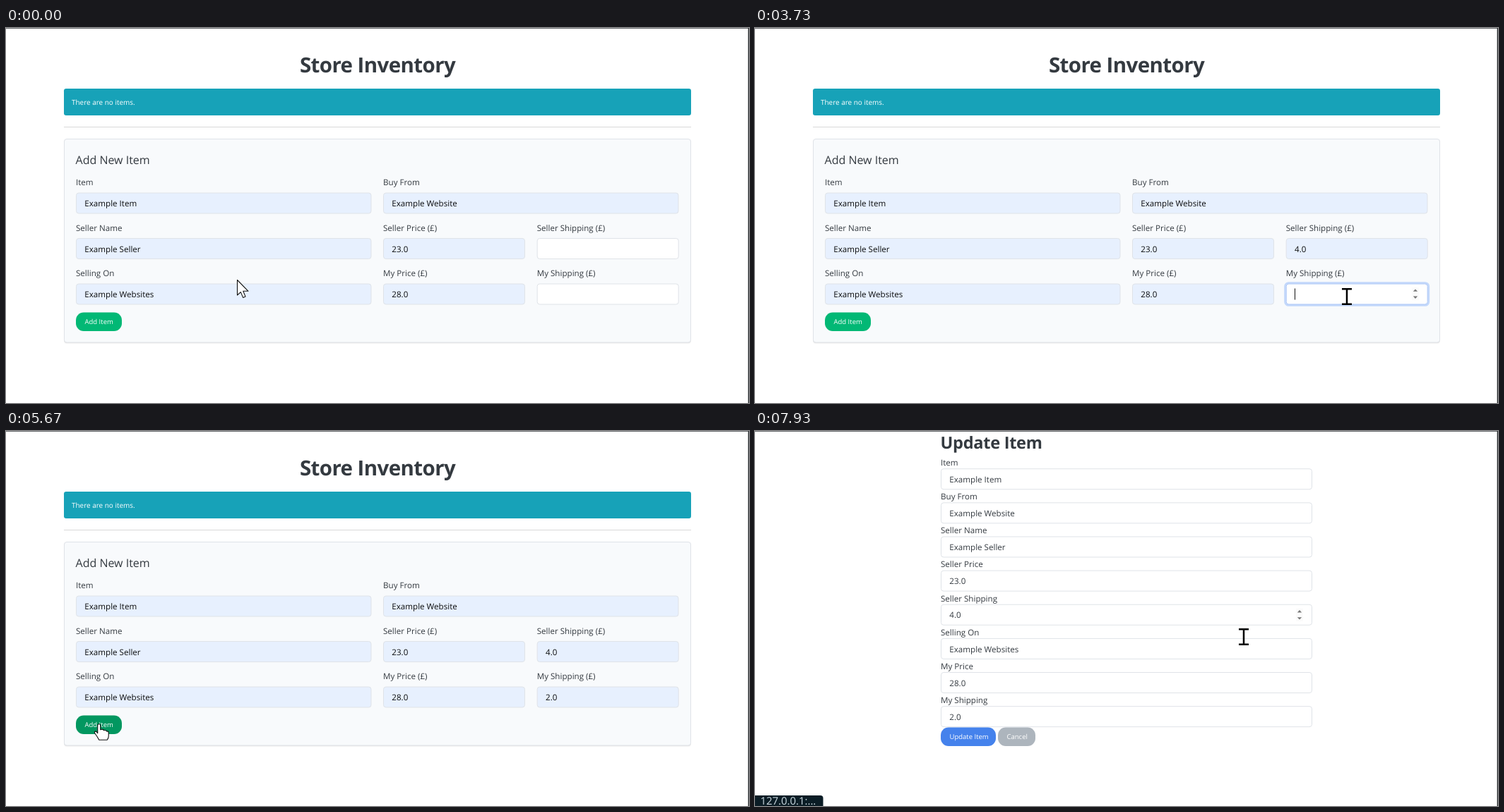
These frames come from a looping animation (1052 by 532 pixels, 8 s). An HTML page:

```html
<!DOCTYPE html>
<html lang="en">
<head>
<meta charset="utf-8">
<title>Store Inventory</title>
<style>
html, body { margin: 0; width: 100%; height: 100%; overflow: hidden; background: #fff; }
svg { display: block; width: 1052px; height: 532px; }
text { font-family: "Open Sans", "Noto Sans", sans-serif; text-rendering: geometricPrecision; white-space: pre; }
</style>
</head>
<body>
<svg id="stage" viewBox="0 0 1052 532"></svg>
<script>
const NS = "http://www.w3.org/2000/svg";
const stage = document.getElementById("stage");
const INK = "#343a40", BLUE = "#4582ec", GREEN = "#02b875", AMBER = "#f0ad4e", RED = "#d9534f";
const FILLED = "#e7f0fe", LINE = "#dfe3e8";

function el(parent, tag, attrs = {}) {
  const node = document.createElementNS(NS, tag);
  for (const k in attrs) node.setAttribute(k, attrs[k]);
  parent.appendChild(node);
  return node;
}
const group = (parent, attrs) => el(parent, "g", attrs);
const rect = (p, x, y, width, height, fill, more) => el(p, "rect", { x, y, width, height, fill, ...more });
function label(p, x, y, str, size = 11.6, fill = INK, more) {
  const node = el(p, "text", { x, y, "font-size": size, fill, ...more });
  node.textContent = str;
  return node;
}
const bold = { "font-weight": 700 };
const show = (node, on) => node.setAttribute("display", on ? "inline" : "none");
const box = (p, x, y, w, h = 29.5) => rect(p, x + .5, y + .5, w - 1, h - .5, "#fff", { rx: 3.5, stroke: LINE });

function button(p, x, y, w, h, r, fill, str, tx, ty, size) {
  const face = rect(p, x, y, w, h, fill, { rx: r });
  label(p, tx, ty, str, size, "#fff");
  return face;
}
function spinner(p, x, y) {
  const g = group(p, { transform: `translate(${x} ${y})` });
  rect(g, -5, -9, 10, 18, "#fbfbfb");
  el(g, "path", { d: "M-3.2 -3.4L0 -6.8L3.2 -3.4zM-3.2 3.4L0 6.8L3.2 3.4z", fill: "#777" });
  return g;
}

// List page
const list = group(stage);
label(list, 526, 63, "Store Inventory", 29.5, INK, { ...bold, "text-anchor": "middle", "letter-spacing": "-.6" });

const empty = group(list);
rect(empty, 82, 86, 888, 38, "#17a2b8", { rx: 3.2 });
label(empty, 93, 108.8, "There are no items.", 9.95, "#fff");

const table = group(list);
rect(table, 82, 86, 888, 27.5, BLUE);
rect(table, 82, 113.5, 888, 29, "#f2f2f2");
rect(table, 82, 142, 888, 1, LINE);
const columns = [
  [87.5, "Item", "Example Item"], [181, "Buy From", "Example Website"],
  [295, "Seller Name", "Example Seller"], [394, "Seller Price", "£23.0"],
  [477.5, "Seller Shipping", "£4.0"], [586.5, "Selling On", "Example Websites"],
  [706.5, "My Price", "£28.0"], [775, "My Shipping", "£2.0"], [869, "Actions", ""]
];
for (const [x, head, cell] of columns) {
  label(table, x, 103.6, head, 10.05, "#fff", bold);
  label(table, x, 131, cell, 10.05, "#16181a");
}
const del = button(table, 869, 119.5, 33.5, 17.5, 8, RED, "Delete", 874.7, 131.3, 7.4);
const upd = button(table, 905, 119.5, 37, 17.5, 8, AMBER, "Update", 911, 131.3, 7.4);

const form = group(list);
rect(form, 82, 140, 888, 1, "#d9d9d9");
rect(form, 82, 158.5, 888, 289.5, "#000", { rx: 4, opacity: .04 });
rect(form, 82, 157.5, 888, 289.5, "#000", { rx: 4, opacity: .06 });
rect(form, 82.5, 157.5, 887, 288.5, "#f8fafc", { rx: 3.5, stroke: LINE });
label(form, 98.5, 193, "Add New Item", 16);

const fields = [
  [99, 0, 418.5, "Item", "Example Item"], [534, 0, 418.5, "Buy From", "Example Website"],
  [99, 1, 418.5, "Seller Name", "Example Seller"], [534, 1, 201, "Seller Price (£)", "23.0"],
  [751.7, 1, 201, "Seller Shipping (£)", "4.0"], [99, 2, 418.5, "Selling On", "Example Websites"],
  [534, 2, 201, "My Price (£)", "28.0"], [751.7, 2, 201, "My Shipping (£)", "2.0"]
].map(([x, row, w, name, value]) => {
  const y = 233.5 + row * 64.5;
  label(form, x, y - 10.3, name);
  const ring = rect(form, x - 1.2, y - 1, w + 2.4, 32, "none", { rx: 5, stroke: "#c3d8fb", "stroke-width": 2.6 });
  const face = box(form, x, y, w);
  const text = label(form, x + 12.3, y + 19.5, value, 11.6, "#0b0c0d");
  return { x, y, ring, face, text };
});
const add = button(form, 99, 403.5, 65, 26.5, 11, GREEN, "Add Item", 111.5, 420.4, 9.5);

// Extras of the two shipping fields
for (const f of [fields[4], fields[7]]) {
  f.arrows = spinner(form, 935, f.y + 14.7);
  f.hint = label(form, f.x + 12.3, f.y + 18.7, f.text.textContent, 9.4, "#0b0c0d");
  f.caret = rect(form, 0, f.y + 7, 1, 16, "#111");
}

// Autofill popup
const popup = group(stage);
const popupShade = { fill: "#000", opacity: .13 };
el(popup, "rect", { x: 819, y: 334, width: 109, height: 32, rx: 5, ...popupShade });
el(popup, "path", { d: "M827 335L834.5 328.3L842 335z", fill: "#191c1e" });
rect(popup, 820, 333.5, 107, 30.5, "#191c1e", { rx: 4 });
const popupHot = group(popup);
rect(popupHot, 822.5, 336, 102, 25.5, "#303437", { rx: 1 });
el(popupHot, "path", { d: "M909.3 345.7l6 6m0-6l-6 6", stroke: "#d8dadb", "stroke-width": 1.2 });
const popupText = label(popup, 827.8, 352, "4.0", 8.4, "#eceeef", bold);

// Edit page
const edit = group(stage);
label(edit, 262.5, 25.3, "Update Item", 23.6, INK, { ...bold, "letter-spacing": "-.3" });
["Item|Example Item", "Buy From|Example Website", "Seller Name|Example Seller", "Seller Price|23.0",
 "Seller Shipping|4.0", "Selling On|Example Websites", "My Price|28.0", "My Shipping|2.0"].forEach((row, i) => {
  const [name, value] = row.split("|"), y = 53.2 + i * 48.14;
  label(edit, 263, y - 4.2, name);
  box(edit, 263, y, 526);
  label(edit, 275.3, y + 19.7, value);
});
spinner(edit, 771, 260.8);
button(edit, 263, 420.5, 78, 26.5, 11, BLUE, "Update Item", 275.5, 437.4, 9.5);
button(edit, 344, 420.5, 53, 26.5, 11, "#adb5bd", "Cancel", 356.5, 437.4, 9.5);

// Window edges and status bubble
rect(stage, 0, 0, 1052, 1, "#6a6d70");
rect(stage, 1050.7, 0, 1.3, 532, "#2b2e31");
const status = group(stage);
el(status, "path", { d: "M0 517H92.5a4 4 0 0 1 4 4V532H0z", fill: "#0b1d26" });
label(status, 7.5, 530.2, "127.0.0.1:...", 14.9, "#cbd9e0");

// Pointers
const pointer = group(stage);
const outlined = { fill: "#fff", stroke: "#111", "stroke-width": 1.1, "stroke-linejoin": "round" };
const shapes = {
  arrow: el(pointer, "path", { d: "M.5 .5V22L5.3 17.6L8.6 25.4L12 23.9L8.8 16.3H16z", ...outlined }),
  beam: el(pointer, "path", { d: "M-7 -10.7H7M-7 10.7H7M0 -11V11", stroke: "#000", "stroke-width": 2.5 }),
  hand: el(pointer, "path", { d: "M-2 2a2 2 0 0 1 4 0v6q4-1.2 4.5 1 3.5-.8 4 1.2 3-.4 3 2V17q0 3-2 5.5H0q-2-4-6-9.5-1-2 .8-2.6 1.7-.2 3.2 2.6z", ...outlined })
};

// Pointer stops: tick, x, y
const path = [
  [3, 327, 357], [6, 300, 436], [9, 300, 436], [12, 738, 343], [16, 738, 343], [19, 777, 317],
  [31, 777, 316.5], [32, 786, 312], [34, 786, 312], [35, 787, 312], [40, 787, 312], [44, 836, 341],
  [45, 836, 341], [46, 843, 346.5], [49, 843, 346.5], [53, 838, 381], [58, 838, 381], [64, 833, 403],
  [68, 838, 407], [69, 838, 407], [72, 508, 403], [74, 508, 403], [79, 300, 430], [84, 132, 416],
  [87, 131, 415], [88, 356, 345], [89, 149, 341], [93, 149, 341], [96, 885, 128], [102, 885, 128],
  [106, 706, 130], [111, 956, 128], [114, 922, 126], [116, 922, 126], [119, 692, 292]
];
function pointerAt(n) {
  const i = path.findIndex(p => p[0] >= n);
  if (i < 1) return (i ? path[path.length - 1] : path[0]).slice(1);
  const [a, ax, ay] = path[i - 1], [b, bx, by] = path[i];
  const u = (n - a) / (b - a), e = u * u * (3 - 2 * u);
  return [ax + (bx - ax) * e, ay + (by - ay) * e];
}
const within = (n, a, b) => n >= a && n < b;
const inside = (x, y, l, t, w, h) => x >= l && x < l + w && y >= t && y < t + h;

const TICK = 1000 / 15, LOOP = 8000;
const SAVED = 88, EDIT = 117;

function shipping(f, n, x, y, s) {
  const focus = within(n, s.focus, s.blur), hint = within(n, s.hint, s.pick), set = within(n, s.pick, SAVED);
  const hover = n < SAVED && inside(x, y, f.x, f.y, 201, 30) && !within(n, s.focus + 1, s.pick);
  show(f.ring, focus);
  f.face.setAttribute("stroke", focus ? "#a6c3f6" : LINE);
  f.face.setAttribute("fill", hint || set ? FILLED : "#fff");
  show(f.text, set);
  show(f.hint, hint);
  show(f.arrows, focus || hover);
  const since = n - (set ? s.pick : s.focus);
  show(f.caret, focus && !hint && since % 16 < 8);
  f.caret.setAttribute("x", set ? 779.6 : 764);
}

function draw(ms) {
  const n = Math.floor(ms / TICK + .06);
  const [x, y] = pointerAt(n);
  const saved = n >= SAVED, editing = n >= EDIT, dy = saved ? 30.3 : 0;

  show(list, !editing);
  show(edit, editing);
  show(empty, !saved);
  show(table, saved);
  show(status, n >= 116);
  form.setAttribute("transform", `translate(0 ${dy})`);

  fields.forEach((f, i) => {
    if (i === 4 || i === 7) return;
    show(f.ring, false);
    show(f.text, !saved);
    f.face.setAttribute("fill", saved ? "#fff" : FILLED);
  });
  shipping(fields[4], n, x, y, { focus: 39, hint: 46, pick: 50, blur: 56 });
  shipping(fields[7], n, x, y, { focus: 56, hint: 66, pick: 69, blur: 85 });

  const second = n >= 56;
  show(popup, within(n, 40, 50) || within(n, 57, 69));
  show(popupHot, within(n, 46, 50) || within(n, 66, 69));
  popup.setAttribute("transform", `translate(0 ${second ? 64.7 : 0})`);
  popupText.textContent = second ? "2.0" : "4.0";

  const onAdd = !saved && inside(x, y, 99, 403, 65, 27);
  const onDel = saved && !editing && inside(x, y, 869, 119, 33, 18);
  const onUpd = saved && !editing && inside(x, y, 905, 119, 37, 18);
  add.setAttribute("fill", onAdd ? "#029760" : GREEN);
  del.setAttribute("fill", onDel ? "#c9302c" : RED);
  upd.setAttribute("fill", onUpd ? "#ed9d2b" : AMBER);

  const overPopup = within(n, 42, 50) || within(n, 61, 69);
  const overField = editing || (!overPopup && fields.some((f, i) =>
    inside(x, y, f.x, f.y + dy, i === 3 || i === 4 || i > 5 ? 201 : 418, 30)));
  const kind = n < 4 ? "arrow" : onAdd || onDel || onUpd ? "hand" : overField ? "beam" : "arrow";
  for (const k in shapes) show(shapes[k], k === kind);
  pointer.setAttribute("transform", `translate(${x} ${y})`);
}

const start = performance.now();
function frame() {
  draw((performance.now() - start) % LOOP);
  requestAnimationFrame(frame);
}
frame();
</script>
</body>
</html>
```
